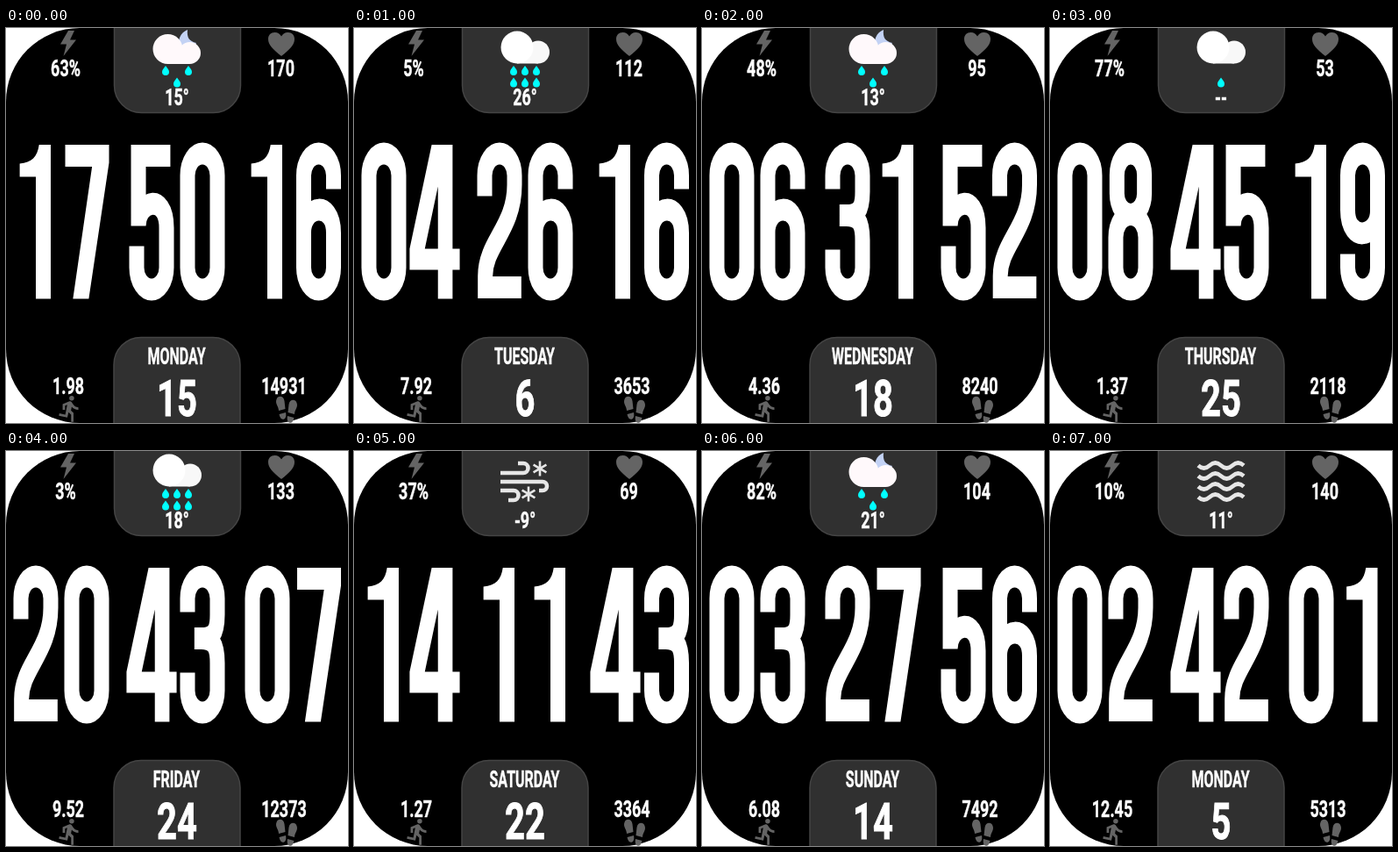
Write an HTML page that moves like this. It is 390 px wide and 450 px high and loops after 8 s.

```html
<!DOCTYPE html>
<html lang="en">
<head>
<meta charset="utf-8">
<title>Watch face</title>
<style>
  html, body { margin: 0; width: 100%; height: 100%; overflow: hidden; background: #fff; }
  svg { display: block; width: 390px; height: 450px; }
  text { font: 700 26px Roboto, Arial, sans-serif; fill: #fff; stroke: #fff; stroke-width: .5; text-anchor: middle; }
  .date { font-size: 58px; stroke-width: 1; }
  .panel { fill: #303030; stroke: #444; stroke-width: 1.5; }
  .icon { fill: #646464; }
  .line { fill: none; stroke: #fff; stroke-width: 25; }
  .solid { fill: #fff; fill-rule: evenodd; }
  .air { fill: none; stroke: #e6e6e6; stroke-width: 4.6; }
  .flake { fill: none; stroke: #e6e6e6; stroke-width: 2.6; }
</style>
</head>
<body>
<svg viewBox="0 0 390 450">
  <rect width="390" height="450" rx="84"/>
  <rect class="panel" x="123.5" y="-40" width="144" height="136.5" rx="31"/>
  <rect class="panel" x="123" y="352.5" width="144" height="140" rx="31"/>
  <g class="icon">
    <path d="M71 3H78L73 13.5H80L65.500 32L69 18.500H62Z"/>
    <path d="M314 32C304 24 299 19 299 12.500C299 8 302 5 306.500 5C310 5 312.500 7 314 9.500C315.500 7 318 5 321.500 5C326 5 329 8 329 12.500C329 19 324 24 314 32Z"/>
    <g transform="translate(56.3 417) scale(1.38)">
      <circle cx="13.5" cy="3.5" r="2"/>
      <path d="M9.900 19.400l1-4.400 2.100 2v6h2v-7.500l-2.100-2 .6-3c1.300 1.500 3.300 2.500 5.500 2.500v-2c-1.900 0-3.500-1-4.300-2.400l-1-1.600c-.4-.6-1-1-1.700-1-.3 0-.5.1-.8.1l-5.200 2.200v4.700h2v-3.400l1.800-.7-1.600 8.100-4.900-1-.4 2z"/>
    </g>
    <path d="M308.500 423C310 418 317 419 317.500 425L318.500 434L311 436C311 431 306.500 428 308.500 423Z"/>
    <path d="M311.500 440L319 438C321 447 313 449 311.500 440Z"/>
    <path d="M331.500 427C330 422 323 423 322.500 429L321.500 438L329 440C329 435 333.500 432 331.500 427Z"/>
    <path d="M328.500 444L321 442C319 451 327 453 328.500 444Z"/>
  </g>
  <g id="weather"></g>
  <g id="time" role="img"></g>
  <g id="labels"></g>
</svg>
<script>
const STEP = 1000;
const SLOTS = [8.5, 66.5, 140.5, 198.5, 272.5, 331];

// time, battery, pulse, weather, temperature, day, date, distance, steps
const STATES = [
  ['175016', '63%', '170', 'night', '15°', 'MONDAY', '15', '1.98', '14931'],
  ['042616', '5%', '112', 'rain', '26°', 'TUESDAY', '6', '7.92', '3653'],
  ['063152', '48%', '95', 'night', '13°', 'WEDNESDAY', '18', '4.36', '8240'],
  ['084519', '77%', '53', 'drizzle', '--', 'THURSDAY', '25', '1.37', '2118'],
  ['204307', '3%', '133', 'rain', '18°', 'FRIDAY', '24', '9.52', '12373'],
  ['141143', '37%', '69', 'snow', '-9°', 'SATURDAY', '22', '1.27', '3364'],
  ['032756', '82%', '104', 'night', '21°', 'SUNDAY', '14', '6.08', '7492'],
  ['024201', '10%', '140', 'fog', '11°', 'MONDAY', '5', '12.45', '5313'],
];

// Digits are drawn in a 75 by 180 box and condensed together.
const TOP = 'A25 25 0 0 1 62.5 37.5';
const BOTTOM = 'V142.5A25 25 0 0 1 12.5 142.5';
const DIGITS = [
  `M12.5 37.5${TOP}${BOTTOM}Z`,
  'M43 2.5H62.5V178H37.5V39H10.5V24C31 23 40 16 43 2.5Z',
  `M12.5 61V37.5${TOP}V48C62.5 98 13.5 115 13.5 152V165H74`,
  `M12.5 53V37.5${TOP}V56C62.5 76 55 83 36 83H24H36C55 83 62.5 91 62.5 111${BOTTOM}V122`,
  'M32.5 2.5H67.5V121H79.5V145H67.5V178H43V145H-4.5V121ZM43 50L21 121H43Z',
  `M69 15H15.5V95C15.5 64 62.5 58 62.5 97${BOTTOM}V118`,
  'M62.5 53V37.5A25 25 0 0 0 12.5 37.5V142.5A25 25 0 0 0 62.5 142.5V103C62.5 66 12.5 70 12.5 102',
  'M1.5 2.5H75V23L41 178H14.5L46.5 27.5H1.5Z',
  `M14.5 37A23 24.5 0 0 1 60.5 37V58A23 24 0 0 1 14.5 58ZM12.5 108A25 26 0 0 1 62.5 108${BOTTOM}Z`,
  'M12.5 127V142.5A25 25 0 0 0 62.5 142.5V37.5A25 25 0 0 0 12.5 37.5V77C12.5 114 62.5 110 62.5 78',
];
const SOLID = '147';

const path = (d, attrs) => `<path d="${d}" ${attrs}/>`;

const digit = (n, i) =>
  path(DIGITS[n], `class="${SOLID.includes(n) ? 'solid' : 'line'}" transform="translate(${SLOTS[i]} 130.5) scale(.68 1)"`);

const text = (s, x, y, squeeze = .69, cls = '') =>
  `<text class="${cls}" transform="translate(${x} ${y}) scale(${squeeze} 1)">${s}</text>`;

const drop = (x, y) =>
  path('M0-5.500C2-2.500 4-1 4 1.500A4 4 0 0 1-4 1.500C-4-1-2-2.500 0-5.500Z', `fill="#0ff" transform="translate(${x} ${y})"`);

const cloud = `<path d="M186 20H210V40.500H186Z" fill="#f8f8f8"/>
  <circle cx="210" cy="27.500" r="13" fill="#f8f8f8"/><circle cx="186" cy="22" r="18.500" fill="#fff"/>`;

const nightCloud = path('M207 2C206 11 209 15 217 17C213 25 203 27 198 22C195 14 199 5 207 2Z', 'fill="#c3d2f4"') +
  `<g fill="#fff9fb"><circle cx="184.500" cy="24" r="17"/><circle cx="209.500" cy="28.500" r="12.500"/>
  <path d="M184 25H209V41H184Z"/></g>`;

const flake = (x, y) =>
  path('M0-8.500V8.500M-7.400-4.300L7.400 4.300M-7.400 4.300L7.400-4.300', `class="flake" transform="translate(${x} ${y})"`);

const wave = y => path(`M169 ${y}q6.500 6 13 0t13 0 13 0 13 0`, 'class="air"');

const WEATHER = {
  night: nightCloud + drop(182, 48.5) + drop(208, 48.5) + drop(195, 62),
  rain: cloud + [48.5, 62].map(y => [182, 195, 208].map(x => drop(x, y)).join('')).join(''),
  drizzle: cloud + drop(195, 62),
  snow: path('M167 25H193A5.500 5.500 0 0 0 193 14H187M167 35H215A5 5 0 0 1 215 45H211M167 45H182A5.500 5.500 0 0 1 182 56H176', 'class="air"') +
    flake(212, 20) + flake(199, 49),
  fog: [16.5, 28.5, 40.5, 52.5].map(wave).join(''),
};

const fill = (id, html) => { document.getElementById(id).innerHTML = html; };

function show([time, battery, pulse, weather, temp, day, date, distance, steps]) {
  fill('weather', WEATHER[weather]);
  fill('time', [...time].map(digit).join(''));
  document.getElementById('time').setAttribute('aria-label', time.match(/../g).join(':'));
  fill('labels',
    text(battery, 68, 55) + text(pulse, 313.5, 55) + text(temp, 195, 88) +
    text(day, 194.5, 383, .615, 'day') + text(date, 195, 442, .69, 'date') +
    text(distance, 71, 417) + text(steps, 317, 417));
}

const start = performance.now();
let shown = -1;
function tick() {
  const i = Math.floor((performance.now() - start) / STEP) % STATES.length;
  if (i !== shown) show(STATES[shown = i]);
  requestAnimationFrame(tick);
}
tick();
</script>
</body>
</html>
```
